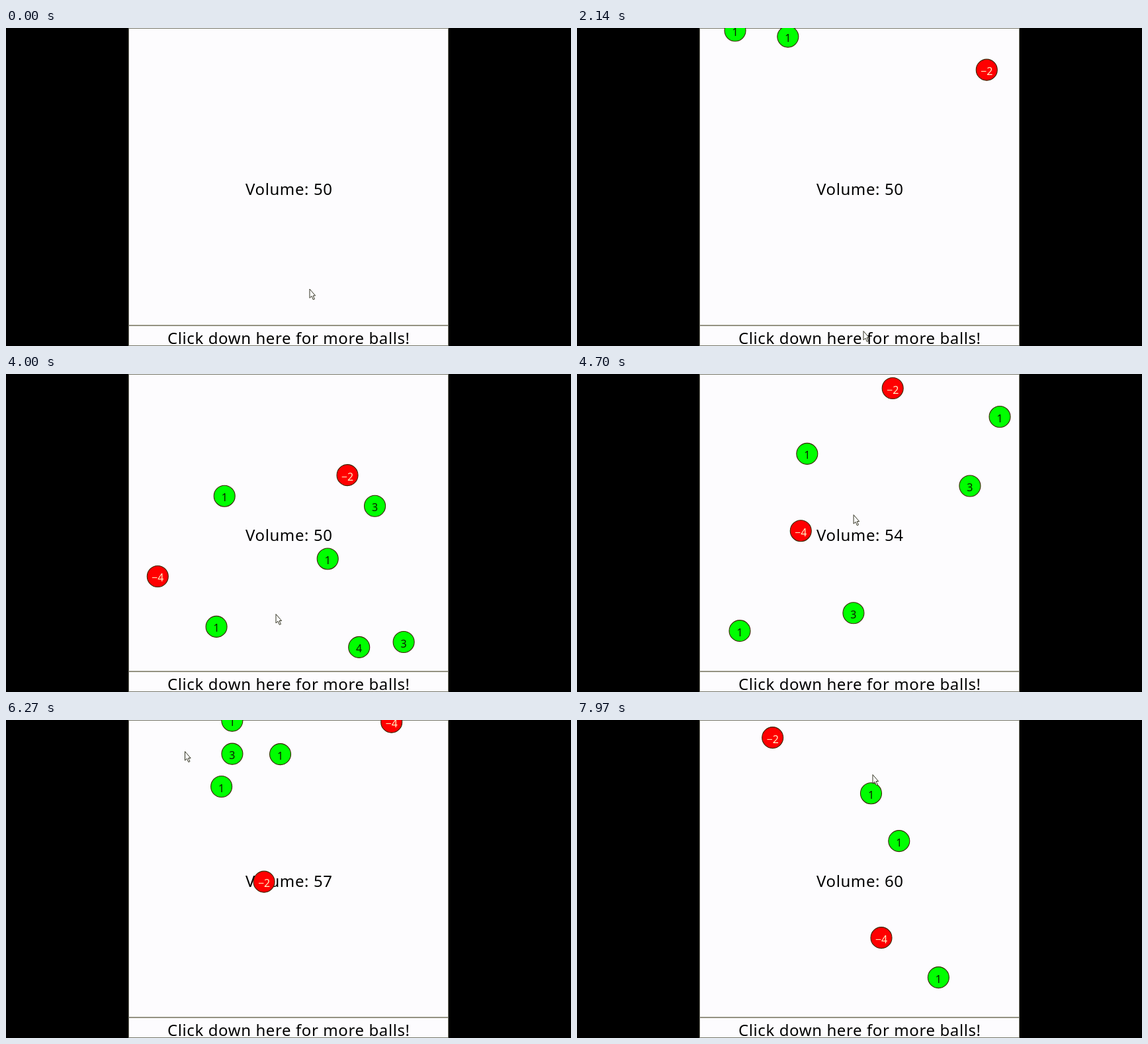
Animation, 854 px wide and 480 px high, one loop 8000 ms. Source, as an HTML page:

```html
<!DOCTYPE html>
<html lang="en">
<head>
<meta charset="utf-8">
<title>Volume balls</title>
<style>
  html, body { margin: 0; height: 100%; overflow: hidden; background: #000; }
  svg { display: block; width: 854px; height: 480px; }
  text { font-family: "Noto Sans", "Open Sans", sans-serif; text-anchor: middle; }
  .big { font-size: 24px; letter-spacing: .6px; }
  .num { font-size: 16px; }
  .ball circle { stroke: #3a2400; stroke-width: 1.1; }
</style>
</head>
<body>
<svg viewBox="0 0 854 480">
  <rect width="854" height="480"/>
  <rect x="185.5" y=".5" width="483" height="479" fill="#fdfcfe" stroke="#77776a"/>
  <path d="M186 449H668" stroke="#2c2a08" stroke-width="1.1"/>
  <text id="volume" class="big" x="427.8" y="252"></text>
  <text class="big" x="427.3" y="477">Click down here for more balls!</text>
  <g id="balls"></g>
  <path id="cursor" d="M0 0V13.5L3 10.7L5.3 16L7.4 15.1L5.1 10H8.6Z" fill="#fff" stroke="#333322"/>
</svg>
<script>
const LOOP = 8, LEFT = 199.5, RIGHT = 653.7, FLOOR = 433, HALF_G = 145, REF = 5.47;

// x is the unfolded position at REF; arcs are [time, height] of each apex.
// Oldest first, and older balls lie on top.
const balls = [
  { n: -2, born: 1.55, x: 434.5, vx: -55.5, arcs: [[1.5745, 16.6], [4.997, 8.8], [8.445, -6]] },
  { n: 1, born: 1.8, x: 500.5, vx: -218.3, arcs: [[1.931, 6.7], [5.407, -7.7], [8.902, -15]] },
  { n: 1, born: 2.03, x: 380.5, vx: 42.5, arcs: [[2.169, 3.9], [5.637, -6.7], [9.107, -4.5]] },
  { n: 4, born: 2.2, gone: 4.57, x: 259, vx: -187, arcs: [[2.3455, 15], [5.78, 5]] },
  { n: 3, born: 2.38, gone: 6.62, x: 470.5, vx: -160.5, arcs: [[2.396, 31], [5.745, 11]] },
  { n: -4, born: 2.57, x: 458, vx: 155.7, arcs: [[2.568, 7.7], [5.999, -7.6], [9.43, 20]] },
  { n: 3, born: 2.76, gone: 5.67, x: 264.5, vx: -199.5, arcs: [[2.8555, 9], [6.3, -10]] },
  { n: 1, born: 2.93, x: 245.5, vx: 120.3, arcs: [[2.924, 16], [6.335, 0.5]] }
];

// [time, x, y] of the pointer tip
const path = [
  [0, 459, 394], [0.85, 459, 394], [1.35, 433, 459], [2.14, 433, 457.5], [3.04, 435, 449.5],
  [4, 408, 362.5], [4.57, 427, 218], [5.47, 272, 123.5], [5.67, 230, 54],
  [6.27, 270.5, 47.5], [6.62, 288, 118], [7.97, 447, 82.5], [8, 447, 82.5]
];

const $ = id => document.getElementById(id);

function make(tag, attrs, parent) {
  const el = document.createElementNS("http://www.w3.org/2000/svg", tag);
  for (const key in attrs) el.setAttribute(key, attrs[key]);
  return parent.appendChild(el);
}

const moveTo = (el, x, y) =>
  el.setAttribute("transform", `translate(${x.toFixed(2)} ${y.toFixed(2)})`);

for (const ball of [...balls].reverse()) {
  const red = ball.n < 0;
  ball.el = make("g", { class: "ball" }, $("balls"));
  make("circle", { r: 16, fill: red ? "#ff0000" : "#00ff00" }, ball.el);
  const label = make("text", { class: "num", y: 8, fill: red ? "#fff0c4" : "#0a1a00" }, ball.el);
  label.textContent = String(ball.n).replace("-", "\u2212");
}

// Reflect a straight run between the two side walls.
function fold(x) {
  const w = RIGHT - LEFT;
  const d = (((x - LEFT) % (2 * w)) + 2 * w) % (2 * w);
  return LEFT + (d > w ? 2 * w - d : d);
}

const height = (arcs, t) =>
  Math.min(FLOOR, ...arcs.map(([at, top]) => top + HALF_G * (t - at) ** 2));

function pointer(t) {
  const i = Math.max(1, path.findIndex(p => p[0] >= t));
  const [a, b] = [path[i - 1], path[i]];
  const u = (t - a[0]) / (b[0] - a[0]);
  const s = u * u * (3 - 2 * u);
  return [a[1] + (b[1] - a[1]) * s, a[2] + (b[2] - a[2]) * s];
}

function draw(t) {
  let volume = 50;
  for (const { n, born, gone = Infinity, x, vx, arcs, el } of balls) {
    if (t >= gone) volume += n;
    el.style.display = t >= born && t < gone ? "" : "none";
    moveTo(el, fold(x + vx * (t - REF)), height(arcs, t));
  }
  $("volume").textContent = "Volume: " + volume;
  moveTo($("cursor"), ...pointer(t));
}

const start = performance.now();
function tick() {
  draw(((performance.now() - start) / 1000) % LOOP);
  requestAnimationFrame(tick);
}
tick();
</script>
</body>
</html>
```
